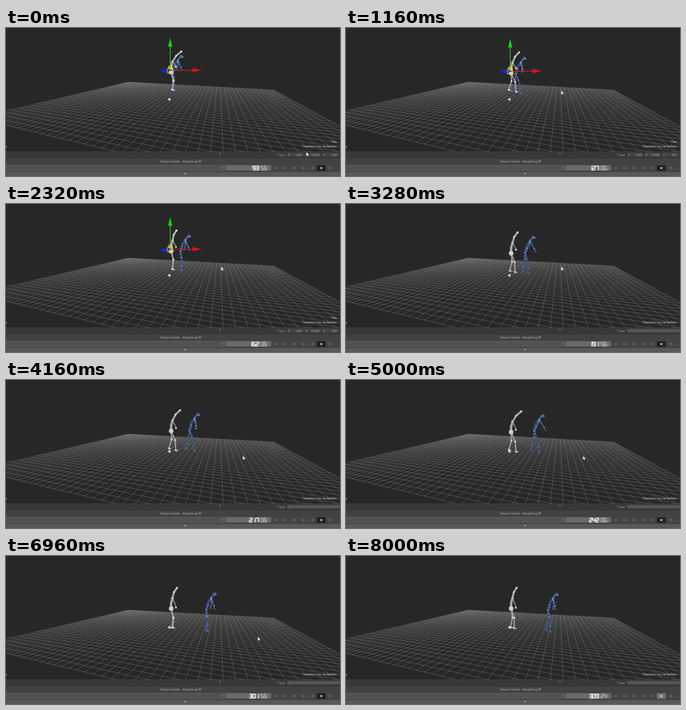
Write an HTML page with a canvas that moves like this. It is 418x186 px and loops after 8120 ms.

```html
<!DOCTYPE html>
<html lang="en">
<head>
<meta charset="utf-8">
<title>Viewer</title>
<style>
html, body { margin: 0; width: 100%; height: 100%; overflow: hidden; background: #272727; }
canvas { display: block; }
</style>
</head>
<body>
<canvas id="stage" width="418" height="186"></canvas>
<script>
const ctx = document.getElementById('stage').getContext('2d');
const LOOP = 8120;
const STOP = 7232;
const DESELECT = 2900;
const SANS = '"Open Sans", "Noto Sans", sans-serif';

const lerp = (a, b, k) => a + (b - a) * k;
const clamp = k => Math.max(0, Math.min(1, k));
const ease = k => { k = clamp(k); return k * k * (3 - 2 * k); };
const add = (p, x, y) => [p[0] + x, p[1] + y];
const along = (a, b, k) => [lerp(a[0], b[0], k), lerp(a[1], b[1], k)];
const noise = n => { const s = Math.sin(n * 127.1) * 43758.5; return s - Math.floor(s); };

function rect(x, y, w, h, color) {
  ctx.fillStyle = color;
  ctx.fillRect(x, y, w, h);
}

function path(points, color, width) {
  ctx.beginPath();
  points.forEach(([x, y]) => ctx.lineTo(x, y));
  ctx.strokeStyle = color;
  ctx.lineWidth = width;
  ctx.stroke();
}

function poly(points, color) {
  ctx.beginPath();
  points.forEach(([x, y]) => ctx.lineTo(x, y));
  ctx.fillStyle = color;
  ctx.fill();
}

function dot([x, y], r, color) {
  ctx.beginPath();
  ctx.arc(x, y, r, 0, 7);
  ctx.fillStyle = color;
  ctx.fill();
}

function text(str, x, y, size, color, align = 'left') {
  ctx.font = size + 'px ' + SANS;
  ctx.textAlign = align;
  ctx.fillStyle = color;
  ctx.fillText(str, x, y);
}

// Floor plane: back corner and two vanishing points
function floorPoint(u, v) {
  const a = 0.27 * u, b = 0.83 * v, w = 1 - a - b;
  return [(153 + a * 338 - b * 267) / w, (68 - a * 41 - b * 41) / w];
}

function floor() {
  const rows = 40, cols = 44, depth = 0.754, near = 0.95;
  const color = 'rgba(160,160,160,.46)';
  ctx.save();
  ctx.beginPath();
  ctx.rect(0, 0, 418, 156);
  ctx.clip();
  for (let i = 0; i <= rows; i++) {
    const v = depth * i / rows;
    path([floorPoint(0, v), floorPoint(Math.min(1, (near - 0.83 * v) / 0.27), v)], color, 0.6);
  }
  for (let i = 0; i <= cols; i++) {
    const u = i / cols;
    path([floorPoint(u, 0), floorPoint(u, Math.min(depth, (near - 0.27 * u) / 0.83))], color, 0.6);
  }
  ctx.restore();
}

// Half a walking cycle takes 768 ms; steps shorten before the stop
function stride(t) {
  return Math.cos(Math.PI * (t - 1160) / 768) * (1 - 0.5 * ease((t - 6400) / 800));
}

function leg(hip, x, y) {
  const foot = add(hip, x, y);
  return [hip, add(along(hip, foot, 0.5), 2, -0.5), foot, add(foot, 2.5, 0.6)];
}

const paleHip = t => [206.7, 55.5 + 10.5 * ease(t / 5800)];

function paleFigure(t) {
  const p = t / STOP, step = 4.5 * stride(t);
  const hip = paleHip(t);
  const neck = add(hip, 1.7, -13);
  const top = add(neck, 8 + 3 * Math.cos(Math.PI * t / 2500), -13);
  const elbow = add(along(neck, top, 0.5), -1, -1);
  const hand = add(hip, 6, -7 + 6 * p);
  const legs = [-step, step].map(s => leg(hip, 1.5 + s, 22 + 2 * p + s * 0.25));
  legs.forEach(l => path(l, '#a4a4a4', 1.5));
  path([hip, add(along(hip, neck, 0.5), -1, 0), neck], '#aaa', 2.8);
  path([neck, elbow, top], '#b2b2b2', 2.2);
  path([neck, add(along(neck, hand, 0.5), 1, 1), hand], '#909090', 1.2);
  for (let i = 0; i < 7; i++) dot(add(along(hip, neck, i / 6), noise(i) * 3 - 1.5, 0), 0.5, '#666');
  dot(hip, 2.9, '#cfcfcf');
  dot(neck, 1.8, '#b4b4b4');
  [top, elbow, hand, ...legs.map(l => l[1]), ...legs.map(l => l[2])].forEach(j => dot(j, 1.2, '#d6d6d6'));
  if (t < DESELECT) dot(add(hip, -1, -6), 2.8, 'rgba(222,222,120,.7)');
}

function blueFigure(t) {
  const p = t / STOP, step = 5 * stride(t);
  const hip = [209 + 44 * p ** 1.35, 55 + 12.5 * p ** 0.9];
  const neck = add(hip, 6, -14.5);
  const head = add(neck, 4.5, -4.8);
  const arms = [10 - step * 0.6, 4 + step * 0.8].map(x => {
    const hand = add(hip, x, -3 + 2 * p);
    return [neck, add(along(neck, hand, 0.5), 1, 1), hand];
  });
  const legs = [-step, step].map(s => leg(hip, s, 22 + 4.5 * p + s * 0.3));
  const limbs = [[hip, add(along(hip, neck, 0.5), -1, -1), neck], [neck, along(neck, head, 0.5), head], ...arms, ...legs];
  limbs.forEach((l, i) => path(l, i ? '#43567f' : '#3b4b72', i ? 1.5 : 3.2));
  dot(head, 2, '#4c6396');
  limbs.forEach((l, i) => {
    for (let k = 0; k < 5; k++) {
      const seed = i * 5 + k + 1;
      const spot = k < 3 ? along(l[0], l[1], k / 3) : along(l[1], l[2], (k - 2) / 2);
      dot(add(spot, noise(seed) * 3.4 - 1.7, noise(seed + 50) * 2 - 1), 0.65, noise(seed + 90) > 0.7 ? '#b8ccf2' : '#6c93e2');
    }
  });
}

function gizmo(t) {
  const [x, y] = add(paleHip(t), -1.2, -2);
  path([[x, y], [x, y - 30]], '#35b52b', 1);
  poly([[x, y - 41], [x - 2.6, y - 30], [x + 2.6, y - 30]], '#19d41c');
  path([[x, y], [x + 28, y - 0.5]], '#c52323', 1);
  poly([[x + 39, y - 0.5], [x + 28, y - 3.3], [x + 28, y + 2.3]], '#dc1515');
  path([[x, y], [x - 6, y + 0.5]], '#2744d8', 1);
  poly([[x - 13, y + 0.5], [x - 5, y - 2.5], [x - 5, y + 3.5]], '#1028e4');
  ctx.strokeStyle = '#e0d83e';
  ctx.lineWidth = 0.8;
  ctx.strokeRect(x - 3, y - 3, 6, 6);
}

function cursor(t) {
  if (t >= 7560) return;
  let tip = [376, 156];
  const move = (start, end, x, y) => { tip = along(tip, [x, y], ease((t - start) / (end - start))); };
  move(160, 800, 269.4, 78.8);
  move(3450, 4200, 296.6, 95.5);
  move(5100, 5800, 308.6, 95.5);
  move(6850, 7500, 394, 173);
  const shape = [[0, 0], [0, 4.6], [1.1, 3.7], [1.9, 5.3], [2.6, 4.9], [1.9, 3.4], [3.1, 3.2]];
  poly(shape.map(([x, y]) => add(tip, x, y)), '#eee');
}

function statusRow(t) {
  rect(0, 156, 418, 7, '#383838');
  rect(0, 155.5, 418, 0.6, '#4a4a4a');
  rect(267.5, 155, 0.7, 5, '#707070');
  text('T Start', 339.5, 160.6, 3.2, '#aaa');
  if (t >= DESELECT) {
    rect(352, 157, 66, 4.5, '#4c4c4c');
    for (let x = 353; x < 416; x += 2) rect(x, 157.5, 0.8, 3.5, '#666');
    return;
  }
  const k = clamp(t / 2320);
  const values = [lerp(-4.2, -6.46, k), lerp(120.52, 110.46, k), lerp(5.5, 4.92, k)];
  values.forEach((value, i) => {
    const x = 352 + i * 22;
    rect(x, 157, 20, 4.5, '#454545');
    text('XYZ'[i], x + 1, 160.6, 3.2, '#bbb');
    text(value.toFixed(2), x + 18, 160.6, 3.2, '#c8c8c8', 'right');
  });
}

// Seven-segment digit: each letter names one lit bar
function digit(d, x, y, color, width) {
  const lit = 'abcdef bc abged abgcd fgbc afgcd afgedc abc abcdefg abcdfg'.split(' ')[d];
  const w = 3, h = 2.5;
  const corner = (cx, cy) => [x + cx * w, y + cy * h];
  const bars = {
    a: [corner(0, 0), corner(1, 0)], b: [corner(1, 0), corner(1, 1)],
    c: [corner(1, 1), corner(1, 2)], d: [corner(0, 2), corner(1, 2)],
    e: [corner(0, 1), corner(0, 2)], f: [corner(0, 0), corner(0, 1)],
    g: [corner(0, 1), corner(1, 1)]
  };
  for (const name of lit) path(bars[name], color, width);
}

function counter(t) {
  const value = Math.min(309.24, 93 + 0.0299 * t);
  const whole = Math.floor(value), part = value - whole;
  const sub = t >= STOP ? Math.round(part * 100) : part < 0.3 ? 56 : 6;
  rect(275, 172.5, 57, 7, '#6a6a6a');
  const digits = String(whole).padStart(3, ' ');
  [...digits].forEach((d, i) => { if (d !== ' ') digit(+d, 304.8 + i * 4.1, 173.6, '#fff', 1); });
  [...String(sub).padStart(2, '0')].forEach((d, i) => digit(+d, 319 + i * 4.2, 173.6, '#c8c8c8', 0.7));
}

function buttons(t) {
  rect(332, 172, 86, 8, '#444');
  for (let i = 0; i < 7; i++) {
    const x = 338 + i * 11.4;
    if (i === 5) continue;
    poly([[x - 1.3, 176], [x + 1, 174.6], [x + 1, 177.4]], '#7a7a7a');
    rect(x - 2, 174.6, 0.5, 2.8, '#7a7a7a');
  }
  rect(389, 172.5, 11, 7, t >= STOP ? '#767676' : '#1f1f1f');
  poly([[393.6, 174.4], [393.6, 177.6], [396.6, 176]], '#eee');
}

function panel(t) {
  statusRow(t);
  rect(0, 163, 418, 9, '#424242');
  rect(0, 163, 418, 0.6, '#333');
  text('Transport Controls  -  Keying Group: TR', 218.3, 168.7, 2.9, '#c9c9c9', 'center');
  rect(0, 172, 275, 8, '#525252');
  rect(0, 172, 418, 0.6, '#606060');
  poly([[270.5, 175.2], [272.5, 175.2], [271.5, 176.7]], '#999');
  counter(t);
  buttons(t);
  rect(0, 180, 418, 6, '#585858');
  rect(0, 180, 418, 0.7, '#383838');
  rect(223.2, 182.2, 1.6, 1.6, '#aaa');
}

function draw(now) {
  const t = now % LOOP, m = Math.min(t, STOP);
  rect(0, 0, 418, 186, '#272727');
  floor();
  blueFigure(m);
  paleFigure(m);
  dot([204.6, 89.7], 1.6, '#dedede');
  dot([204.6, 89.7], 0.6, '#aaa');
  if (t < DESELECT) {
    gizmo(t);
    text('Hips', 414, 143.6, 3.2, '#ddd', 'right');
  }
  text('Translation: Use manipulator', 414, 149.9, 3.2, '#e4e4e4', 'right');
  rect(0, 148, 0.8, 3, '#999');
  panel(t);
  cursor(t);
}

const start = performance.now();
function tick() {
  draw(performance.now() - start);
  requestAnimationFrame(tick);
}
ctx.lineJoin = ctx.lineCap = 'round';
tick();
</script>
</body>
</html>
```
